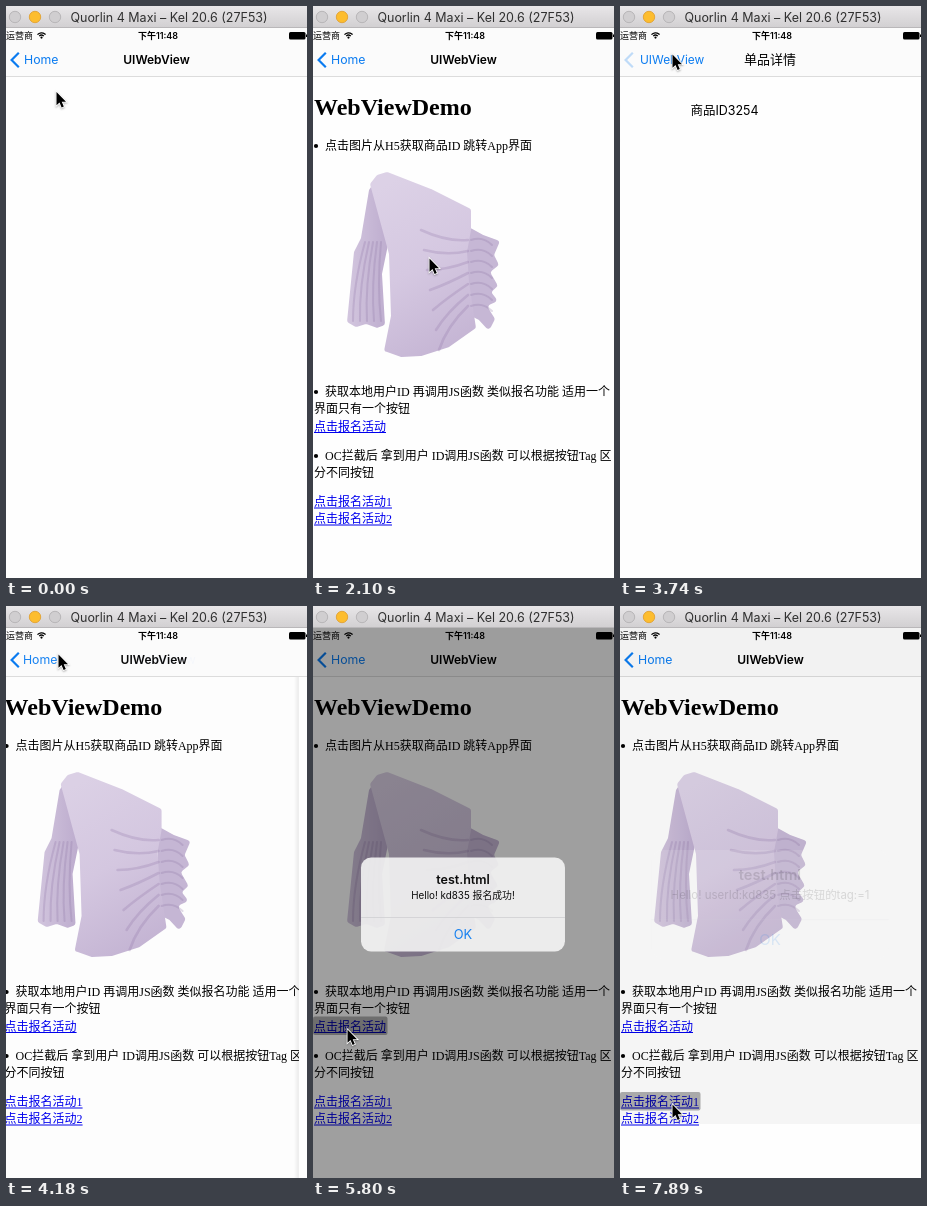
Recreate the animation shown at these times as an HTML page with a canvas. Size 301 by 572 pixels, loop 8000 ms.

```html
<!DOCTYPE html>
<html lang="zh-CN">
<head>
<meta charset="utf-8">
<title>WebView demo</title>
<style>
html, body { margin: 0; width: 100%; height: 100%; overflow: hidden; background: #fefefe; }
canvas { display: block; width: 301px; height: 572px; }
</style>
</head>
<body>
<canvas id="stage"></canvas>
<script>
const W = 301, H = 572, LOOP = 8000, NAV = 71;
const SANS = 'Inter, "Noto Sans CJK SC", "Noto Sans CJK", sans-serif';
const SERIF = '"Liberation Serif", "Noto Sans CJK SC", "Noto Sans CJK", serif';
const BLUE = '#0a7bf0';

// Moments of the story, in ms
const OPEN = 1200, IMAGE = 1340, PUSH = 2700, BACK = 3700, POP = 3820;
const TAP1 = 5500, ALERT1 = 5510, DISMISS = 6820, RELEASE = 6900, TAP2 = 7865;

const canvas = document.getElementById('stage');
const ctx = canvas.getContext('2d');
const ratio = window.devicePixelRatio || 1;
canvas.width = Math.round(W * ratio);
canvas.height = Math.round(H * ratio);

const clamp = v => Math.max(0, Math.min(1, v));
const ease = v => v * v * (3 - 2 * v);
const mix = (a, b, k) => a + (b - a) * k;

const FRAME = 148.4;
const snap = t => OPEN + Math.floor((t - OPEN + 4) / FRAME) * FRAME;

// Settling curve shared by page transitions and alerts
const settle = (t, start) => t < start ? 0 : 1 - Math.exp((start - t) * 0.0104);

function pointer(t) {
  let [x, y] = [50.5, 86];
  const move = (start, time, tx, ty) => {
    const k = ease(clamp((t - start) / time));
    x = mix(x, tx, k);
    y = mix(y, ty, k);
  };
  move(1500, 290, 84, 211);
  move(1950, 130, 116.5, 252.5);
  move(3150, 420, 52.5, 48.5);
  move(4610, 720, 34.5, 423.5);
  move(5800, 580, 171.5, 323);
  move(6990, 270, 52.5, 498.5);
  return [x, y];
}

function text(str, x, y, size, opt = {}) {
  ctx.font = `${opt.weight || 400} ${size}px ${opt.family || SANS}`;
  ctx.fillStyle = opt.color || '#000';
  ctx.textAlign = opt.align || 'left';
  ctx.fillText(str, x, y);
}

function rect(x, y, w, h, color) {
  ctx.fillStyle = color;
  ctx.fillRect(x, y, w, h);
}

function roundRect(x, y, w, h, r, color) {
  ctx.beginPath();
  ctx.roundRect(x, y, w, h, r);
  ctx.fillStyle = color;
  ctx.fill();
}

function dot(x, y, r, color, edge) {
  ctx.beginPath();
  ctx.arc(x, y, r, 0, Math.PI * 2);
  ctx.fillStyle = color;
  ctx.fill();
  if (edge) {
    ctx.lineWidth = 1;
    ctx.strokeStyle = edge;
    ctx.stroke();
  }
}

function gradient(x1, y1, x2, y2, ...colors) {
  const g = ctx.createLinearGradient(x1, y1, x2, y2);
  colors.forEach((c, i) => g.addColorStop(i / (colors.length - 1), c));
  return g;
}

function layer(draw, alpha = 1) {
  ctx.save();
  ctx.globalAlpha *= alpha;
  draw();
  ctx.restore();
}

function titleBar() {
  rect(0, 0, W, 21, gradient(0, 0, 0, 21, '#e8e6e8', '#d2d0d2'));
  rect(0, 21, W, 1, '#b9b7b9');
  dot(9, 11, 5.7, '#d0ced0', '#b8b6b8');
  dot(29, 11, 5.7, '#fdbd2e', '#e3a63a');
  dot(49, 11, 5.7, '#d0ced0', '#b8b6b8');
  text('Quorlin 4 Maxi – Kel 20.6 (27F53)', 163, 16, 12.5, { align: 'center', color: '#303030' });
}

function statusBar() {
  text('运营商', 0, 33, 9);
  text('下午11:48', 152, 33, 9, { weight: 600, align: 'center' });
  ctx.strokeStyle = '#000';
  ctx.lineWidth = 1.3;
  for (const r of [2.9, 5.2]) {
    ctx.beginPath();
    ctx.arc(35.5, 32, r, -Math.PI * 0.78, -Math.PI * 0.22);
    ctx.stroke();
  }
  dot(35.5, 31.6, 1.1, '#000');
  roundRect(283, 26, 16.5, 7.5, 1.5, '#000');
  rect(300, 28.5, 1, 2.5, '#000');
}

function chevron() {
  ctx.beginPath();
  ctx.moveTo(12.8, 46.8);
  ctx.lineTo(5.6, 54);
  ctx.lineTo(12.8, 61.2);
  ctx.lineWidth = 2.2;
  ctx.strokeStyle = BLUE;
  ctx.stroke();
}

function navBar(d, pressed) {
  const off = W * (1 - d);
  const title = { weight: 600, align: 'center' };
  rect(0, 22, W, NAV - 22, '#fbfbfb');
  rect(0, NAV - 1, W, 1, '#dcdcdc');
  statusBar();
  layer(chevron, pressed ? 0.25 : 1);
  layer(() => text('Home', 18 - 40 * d, 58, 12.3, { color: BLUE }), clamp(1 - d * 2));
  layer(() => text('UIWebView', 150.5 - 98 * d, 58, 12, title), clamp(1 - d * 1.6));
  layer(() => text('UIWebView', 20 + off * 0.36, 58, 11.9, { color: BLUE }), d);
  layer(() => text('单品详情', 150 + off * 0.707, 58, 13, { ...title, weight: 500 }), d);
}

function shape(points, fill) {
  const last = points[points.length - 1];
  ctx.beginPath();
  ctx.moveTo((last[0] + points[0][0]) / 2, (last[1] + points[0][1]) / 2);
  points.forEach(([x, y], i) => {
    const [nx, ny] = points[(i + 1) % points.length];
    ctx.arcTo(x, y, nx, ny, 3);
  });
  ctx.closePath();
  ctx.fillStyle = fill;
  ctx.fill();
}

function fold(x1, y1, cx, cy, x2, y2) {
  ctx.beginPath();
  ctx.moveTo(x1, y1);
  ctx.quadraticCurveTo(cx, cy, x2, y2);
  ctx.stroke();
}

function blouse() {
  shape([[154, 220], [170, 229], [187, 235], [181, 249], [186, 259], [177, 266],
    [185, 280], [178, 286], [185, 295], [174, 300], [182, 313], [176, 325],
    [166, 314], [154, 308]], '#c6b7d5');
  shape([[64, 172], [56, 184], [48, 232], [41, 246], [34, 316], [43, 321],
    [53, 318], [64, 322], [72, 319], [69, 268], [76, 234], [76, 180]],
    gradient(36, 0, 76, 0, '#d2c5de', '#bdacce'));
  shape([[57, 178], [64, 169], [74, 166], [118, 183], [158, 203], [158, 224],
    [154, 246], [156, 276], [163, 322], [136, 341], [108, 350], [88, 351],
    [71, 345], [78, 310], [76, 248]],
    gradient(70, 180, 160, 330, '#dcd1e6', '#d5c8e1', '#c5b5d4'));
  ctx.lineCap = 'round';
  ctx.strokeStyle = 'rgba(138,114,162,.25)';
  for (let i = 0; i < 7; i++) {
    const y = 234 + i * 11;
    ctx.lineWidth = 2.6;
    fold(155, y, 134, y + 2 + i * 3, 108 + i * 3, y - 10 + i * 9);
    ctx.lineWidth = 2;
    fold(158, y, 170, y - 4, 179, y + 5);
  }
  for (let i = 0; i < 5; i++) fold(52 + i * 4, 236, 40 + i * 6, 280, 40 + i * 7, 315);
}

function link(str, y, active) {
  text(str, 1, y, 12, { family: SERIF, color: '#0000ee' });
  const w = ctx.measureText(str).width;
  rect(1, y + 1.5, w, 1, '#0000ee');
  if (active) roundRect(0, y - 14, w + 2.5, 18.5, 2, 'rgba(0,0,0,.31)');
}

function webPage(t) {
  const loaded = t >= IMAGE;
  const down = loaded ? 214 : 0;
  const line = (str, x, y) => text(str, x, y, 12, { family: SERIF });
  const item = (str, y) => {
    dot(3, y - 4, 2.1, '#000');
    line(str, 12, y);
  };
  text('WebViewDemo', 1, 108.5, 24, { family: SERIF, weight: 700 });
  item('点击图片从H5获取商品ID 跳转App界面', 144);
  if (loaded) blouse();
  item('获取本地用户ID 再调用JS函数 类似报名功能 适用一个', 176 + down);
  line('界面只有一个按钮', 1, 193 + down);
  link('点击报名活动', 210.5 + down, t >= TAP1 && t < RELEASE);
  item('OC拦截后 拿到用户 ID调用JS函数 可以根据按钮Tag 区', 240 + down);
  line('分不同按钮', 1, 257 + down);
  link('点击报名活动1', 286 + down, t >= TAP2);
  link('点击报名活动2', 303 + down, false);
}

function detailPage(off) {
  rect(off - 5, NAV, 5, H - NAV, gradient(off - 5, 0, off, 0, 'rgba(0,0,0,0)', 'rgba(0,0,0,.08)'));
  rect(off, NAV, W, H - NAV, '#fefefe');
  text('商品ID3254', 104.5 + off * 1.06, 109, 12.5, { align: 'center' });
}

function alertBox(message, scale) {
  const mid = { align: 'center' };
  ctx.translate(150, 298.5);
  ctx.scale(scale, scale);
  ctx.translate(-150, -298.5);
  roundRect(49, 252, 202, 93, 10, 'rgba(244,244,244,.95)');
  rect(49, 311, 202, 0.8, '#cfcfd2');
  text('test.html', 150, 278, 12.4, { ...mid, weight: 600 });
  text(message, 150, 293.5, 9.75, mid);
  text('OK', 150, 333, 12.75, { ...mid, color: BLUE });
}

function arrow(x, y) {
  ctx.translate(x, y);
  ctx.scale(0.95, 0.95);
  ctx.beginPath();
  [[0, 0], [0, 14], [3.2, 11], [5.4, 16.2], [7.7, 15.2], [5.5, 10.2], [10, 10.2]]
    .forEach(p => ctx.lineTo(...p));
  ctx.closePath();
  ctx.shadowColor = 'rgba(0,0,0,.3)';
  ctx.shadowBlur = 2 * ratio;
  ctx.shadowOffsetY = ratio;
  ctx.lineWidth = 1.8;
  ctx.strokeStyle = '#fff';
  ctx.stroke();
  ctx.shadowColor = 'transparent';
  ctx.fillStyle = '#000';
  ctx.fill();
}

function render(time) {
  const t = snap(time);
  const detail = settle(t, PUSH) - settle(t, POP);
  const shown = settle(t, ALERT1) - settle(t, DISMISS) + settle(t, TAP2);
  const off = W * (1 - detail);
  const second = t >= TAP2;

  ctx.setTransform(ratio, 0, 0, ratio, 0, 0);
  rect(0, 0, W, H, '#fefefe');
  if (t >= OPEN) {
    layer(() => {
      ctx.translate(-W * detail * 0.3, 0);
      webPage(t);
    });
  }
  if (detail > 0.002) {
    rect(0, NAV, off, H - NAV, `rgba(0,0,0,${0.1 * detail})`);
    detailPage(off);
  }
  navBar(detail, t >= BACK && t < POP);

  if (shown > 0.01) {
    // The second veil has only reached part of the screen
    rect(0, 22, W, second ? 496 : H - 22, `rgba(0,0,0,${0.4 * shown ** 1.15})`);
    const message = second ? 'Hello! userId:kd835 点击按钮的tag:=1' : 'Hello! kd835 报名成功!';
    const scale = t < DISMISS || second ? 1 + 0.2 * (1 - shown) : 1;
    layer(() => alertBox(message, scale), shown);
  }
  titleBar();
  layer(() => arrow(...pointer(t)));
}

const start = performance.now();
function tick() {
  render((performance.now() - start) % LOOP);
  requestAnimationFrame(tick);
}
tick();
</script>
</body>
</html>
```
